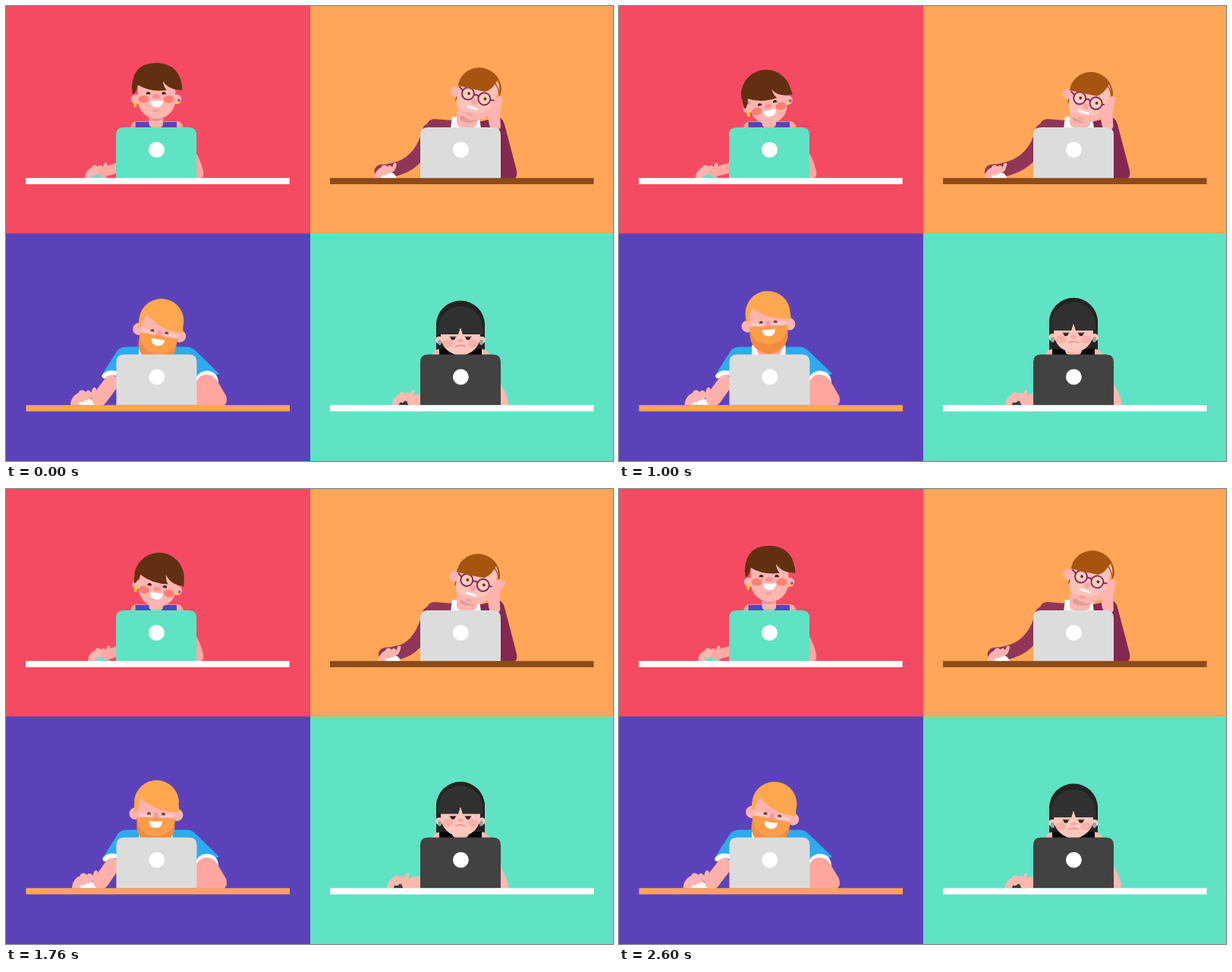
An HTML page for the animation above (2.64 s loop, 800 px wide and 600 px high).

```html
<!DOCTYPE html>
<html lang="en">
<head>
<meta charset="utf-8">
<title>Four desks</title>
<style>
  html, body { margin: 0; width: 100%; height: 100%; overflow: hidden; }
  svg { display: block; width: 100vw; height: 100vh; }
</style>
</head>
<body>
<svg id="stage" viewBox="0 0 800 600" xmlns="http://www.w3.org/2000/svg"></svg>
<script>
const LOOP = 2640, STEP = 40;
const TIMES = [0, 360, 1000, 1320, 1760, 2200];

// Rows per key time: head x, head y, tilt, feature drop, hand x, finger
const POSES = {
  mint: [
    [198.5, 108, 0, 0, 104], [200.5, 114, 5, 4.6, 108], [193.5, 115, -12, 6, 101],
    [191.5, 116, -14, 5.3, 107], [202, 115, 8.6, 5.6, 108], [199, 107, 0, 0, 108]
  ],
  wine: [
    [625, 105, 18, 0, 485.5, 0], [625, 105.5, 18, .6, 489.5, .7], [624, 108, 17.5, 3, 482, 0],
    [624, 108, 17.5, 3.2, 488, 1], [624, 107, 17.5, 2.5, 491, .7], [625, 105.5, 18, 1, 490.5, 0]
  ],
  beard: [
    [205.2, 413.5, 10, 5, 85], [193, 413.8, -7, 4.5, 87], [196, 403.5, -3, 2, 86.5],
    [198.3, 398.5, .5, 0, 82.5], [198.5, 411.5, 2, 5.5, 87], [204, 413.5, 9, 5, 80]
  ],
  fringe: [
    [599, 420.5, 0, 4.5, 509], [599, 412, 0, 0, 509], [599, 416.8, 0, 3, 509],
    [599, 420.2, 0, 4.8, 508], [599, 418, 0, 2.3, 502], [599, 418, 0, 2.3, 509]
  ]
};

const path = (d, fill, more = '') => `<path d="${d}" fill="${fill}" ${more}/>`;
const line = (d, color, w, more = '') =>
  path(d, 'none', `stroke="${color}" stroke-width="${w}" stroke-linecap="round" ${more}`);
const oval = (x, y, rx, ry, fill, more = '') =>
  `<ellipse cx="${x}" cy="${y}" rx="${rx}" ry="${ry}" fill="${fill}" ${more}/>`;
const disc = (x, y, r, fill, more) => oval(x, y, r, r, fill, more);
const rect = (x, y, w, h, fill, r = 0, more = '') =>
  `<rect x="${x}" y="${y}" width="${w}" height="${h}" rx="${r}" fill="${fill}" ${more}/>`;
const pair = (draw, x) => draw(-x) + draw(x);
const at = (x, y, inner) => `<g transform="translate(${x} ${y})">${inner}</g>`;
const part = (id, inner) => `<g id="${id}">${inner}</g>`;

function furniture(x, y, lid, desk) {
  return at(x, y,
    path('M145 227V170Q145 160 155 160H241Q251 160 251 170V227Z', lid) +
    disc(198.4, 189.7, 10.4, '#fff') +
    rect(26, 226.8, 347.6, 8.2, desk));
}

function hand(id, skin, mouse, size = 1) {
  return part(id + 'Hand', `<g transform="scale(${size})">` +
    path('M8 0C10-6 15-9 21-8Q28-6 29 0Z', mouse) +
    path('M0 0C0-7 4-12 9-14C10-18 15-18 17-15C19-18 23-17 23.500-14L25-18.500' +
      'C26-21.500 30-20.500 29.300-17.500L27.500-12Q26-7 21-8Q20-4 17-6Q14-2 11-4Q9-3 9 0Z', skin) +
    '</g>');
}

const smile = y => path(
  `M-8.500 ${y}Q0 ${y + 1} 8.500 ${y}Q8.500 ${y + 9} 0 ${y + 9}Q-8.500 ${y + 9}-8.500 ${y}Z`, '#fff');
const face = (top, side, low, fill) => path(
  `M${-side} ${top}V${low}A${side} ${side} 0 0 0 ${side} ${low}V${top}Z`, fill);
const happyEye = (x, y) => path(`M${x - 2.8} ${y}a2.800 3.300 0 0 1 5.600 0Z`, '#4a1c14');

function mint() {
  const skin = '#ffa8a4', light = '#fdb5b0', hair = '#623010';
  const body =
    line('', skin, 13, 'id="mintArm"') +
    path('M250 193Q257 204 260 218Q262 228 252 228H246Z', skin) +
    path('M164 162Q165 152 172 152H226Q233 153 234 162Z', skin) +
    rect(170.500, 152.800, 54.500, 9, '#5c42ba') +
    path('M188.500 140H207V155Q207 161 198 161Q188.500 161 188.500 155Z', light) +
    oval(198, 147, 9.200, 4.500, '#ea8f8f');
  const head =
    disc(-27.500, 15, 6.200, light) + disc(26.500, 15, 6.200, light) +
    rect(-30, 18, 3.600, 7.500, '#ffd21f', 1.500) +
    path('M24 21L27 15.500L30 20Z', '#ffd21f') + disc(29.500, 16.500, 2, '#8a5bd0') +
    face(-14, 24.800, 16, light) +
    oval(-1, 30, 4, 1.800, '#f69e98') +
    path('M-33 2A33 33 0 0 1 33 2Q0-28-33 2Z', hair) +
    part('mintLook',
      oval(-17, 15, 7, 5, '#ff7f72') + oval(16, 15, 7, 5, '#ff7f72') +
      oval(-.500, 11.500, 5, 3, '#f9938f') +
      happyEye(-11, 8.500) + happyEye(9.500, 8.500) + smile(16.500) +
      path('M-32 8Q-36-33 0-33Q32-32 34 3L24 2Q13-1 8.500-9Q9-2 13 3Q-8 6-25-4Q-26 4-30 8Z', hair));
  return hand('mint', light, '#5fe3c4') + body + part('mintHead', head);
}

function wine() {
  const coat = '#913658', dark = '#84284f', skin = '#fdb4b0', light = '#fdc3bb', hair = '#a85411';
  const lens = x => disc(x, 15, 8, '#fbd9c4', 'fill-opacity=".6" stroke="#8a2a52" stroke-width="2"') +
    disc(x + 1, 14.500, 2, '#6b3a22');
  const body =
    line('', coat, 18, 'id="wineArm"') +
    path('M546 192Q550 172 555 156Q557 149 565 149L590 151V192Z', coat) +
    path('M590 150L626 152L650 147Q655 149 657 156L673 217Q675 227 668 228H640L632 160H590Z', dark) +
    path('M586 162L588 146H624L626 162Z', '#fff') +
    path('M594 138H621V155Q620 161 608 161Q595 161 594 155Z', skin) +
    oval(611, 148, 13, 6, '#e49a98');
  const head =
    path('M-27 15L-25 30L-20 20Z', hair) +
    disc(-28.500, 17.500, 7, skin) +
    face(-10, 24.500, 22, light) +
    path('M-18 38A24.500 24.500 0 0 0 24.500 22L24.500 18Q16 42-18 38Z', '#f7a9a6', 'opacity=".55"') +
    path('M-28 8A29 29 0 0 1 29 8Q14-30-28 8Z', hair) +
    part('wineLook',
      oval(-2, 40, 4.500, 2, '#f6a19f') + oval(-1, 23, 4, 4, '#f8a5a8') +
      lens(-12) + lens(10.500) +
      line('M-3.500 14Q-1 12 2 14M-20 13L-25 10M18.500 14L23 13', '#8a2a52', 2) +
      line('M-7 31H5', '#fff', 2.800) +
      path('M-28 9V0A29 29 0 0 1 29 0L28 9Q27-6 19.400-14Q17 0 9 5.500Q-10 8-28 9Z', hair));
  const prop =
    part('wineProp', line('', skin, 6, 'id="wineFinger"') +
      path('M634 139Q640 132 644 124Q647 119 652 119Q656 121 654 128Q652 136 651 142' +
        'L652 159Q651 164 645 164Q639 164 637 157Z', skin));
  return body + hand('wine', skin, '#fff') + part('wineHead', head) + prop;
}

function beard() {
  const skin = '#ffa69e', light = '#fdb4b0', hair = '#fda84f', blue = '#2eabf0';
  const body =
    line('', '#ffb0aa', 20, 'id="beardArm"') +
    part('beardSleeve', path('M126 487L145 457Q149 449.500 158 449.500H180V490H146Q134 481 126 487Z', blue) +
      line('M129.500 488Q136 481 147 485', '#fff', 6)) +
    path('M170 449.500H238Q245 449.500 250 455L281 485L262 492L251 500H200Z', blue) +
    path('M249 494Q253 481 266 481Q280 483 280 498Z', '#fff') +
    path('M251 496Q254 486 265 486Q275 487 280 497L290 514Q294 527 282 528H250Z', skin) +
    path('M175 462V447H219.500V462Z', '#fff') +
    path('M182 440H214V456Q212 462 198 462Q184 462 182 456Z', skin);
  const head =
    pair(x => disc(x, 17.500, 8, light), 27.500) +
    face(-8, 25, 24, light) +
    path('M-29.500 2A29.500 29.500 0 0 1 29.500 2Q0-32-29.500 2Z', hair) +
    part('beardLook',
      oval(0, 14, 5.500, 4, '#f796a2') +
      face(17, 25, 28, '#f28d40') +
      path('M-25 17H25A25 24 0 0 1-25 17Z', '#fb9d49') +
      happyEye(-9.500, 13) + happyEye(9.500, 13) +
      pair(x => rect(x - 10.500, 11, 21, 4.500, '#fff', 1, 'opacity=".28"'), 13) +
      smile(21) +
      path('M-29 10L-29.500 0A29.500 29.500 0 0 1 29.500 0L30.500 8Q0 10-21-9Q-23 0-25 9Z', hair));
  return hand('beard', light, '#fff', 1.16) + body + part('beardHead', head);
}

function fringe() {
  const skin = '#fdb9b0', light = '#fcc8bd', hair = '#232323';
  const dome = (r, low) => `M${-r} ${low}V0A${r} ${r} 0 0 1 ${r} 0V${low}`;
  const eye = x => path(`M${x - 3.500} 11.500h7q-.5 4-3.500 4q-3 0-3.500-4Z`, '#33201f') +
    line(`M${x - 4} 11.300h8`, '#5b3b3a', 1);
  const back = part('fringeBack', path('M-32 0A32 32 0 0 1 32 0V60H-32Z', hair));
  const body =
    oval(543, 531, 5, 4.500, skin) +
    line('', skin, 15, 'id="fringeArm"') +
    path('M650 494Q658 508 662 521V528H644Z', skin) +
    path('M561 464Q563 452.500 571 452.500H628Q636 453 638 464Z', skin) +
    rect(571, 452, 56, 12, '#070707') +
    path('M588 440H610V455Q609 461 599 461Q589 461 588 455Z', skin) +
    oval(599, 449, 11, 4, '#ea9d98');
  const head =
    pair(x => disc(x, 20, 4.800, light), 28) +
    pair(x => oval(x, 23, 2.500, 3.600, '#98a3a3'), 27.500) +
    face(-6, 26, 14, light) +
    path('M-32 2A32 32 0 0 1 32 2Q0-28-32 2Z', hair) +
    part('fringeLook',
      pair(x => oval(x, 20, 7, 5.200, '#fbb0a9'), 16.500) +
      oval(0, 16.500, 4, 2.500, '#f7a9a4') + pair(eye, 10) +
      line('M-6 24Q0 21 6 24', '#ec8c8b', 1.800) +
      path(dome(32, 8) + 'H3L0-2L-3 8Z', hair) +
      path(dome(29, 8) + 'H3L0-2L-3 8Z', '#313131'));
  return back + hand('fringe', skin, '#383838') + body + part('fringeHead', head);
}

const stage = document.getElementById('stage');
stage.innerHTML =
  rect(0, 0, 401, 300, '#f44b63') + rect(401, 0, 399, 300, '#ffa658') +
  rect(0, 300, 401, 300, '#5c42ba') + rect(401, 300, 399, 300, '#5fe3c4') +
  mint() + furniture(0, 0, '#5fe3c4', '#fff') +
  wine() + furniture(401, 0, '#dcdcdc', '#8d4a1b') +
  beard() + furniture(.4, 299.500, '#dcdcdc', '#ffa652') +
  fringe() + furniture(401, 299.500, '#424242', '#fff');

const parts = {};
stage.querySelectorAll('[id]').forEach(el => parts[el.id] = el);
const move = (id, x, y, turn = 0) => parts[id] &&
  parts[id].setAttribute('transform', `translate(${x} ${y}) rotate(${turn})`);
const shape = (id, d) => parts[id].setAttribute('d', d);

// Periodic cubic that rests at its extremes
function sample(rows, col, t) {
  const n = TIMES.length;
  const time = i => TIMES[(i + n) % n] + Math.floor(i / n) * LOOP;
  const val = i => rows[(i + n) % n][col];
  const rate = i => (val(i + 1) - val(i)) / (time(i + 1) - time(i));
  const slope = i => {
    const a = rate(i - 1), b = rate(i);
    return a * b > 0 ? 2 * a * b / (a + b) : 0;
  };
  let i = n - 1;
  while (TIMES[i] > t) i--;
  const span = time(i + 1) - time(i), u = (t - time(i)) / span, v = 1 - u;
  return v * v * ((1 + 2 * u) * val(i) + u * span * slope(i)) +
    u * u * ((3 - 2 * u) * val(i + 1) - v * span * slope(i + 1));
}

const DESK = { mint: 227, wine: 227, beard: 526.5, fringe: 526.5 };
const ARMS = {
  mint: x => `M152 212L${x + 24} 219`,
  wine: x => `M558 164Q548 204 ${x + 32} 214Q${x + 18} 218 ${x + 9} 218`,
  beard: x => `M${141 + (x - 85) * .4} 494L${x + 38} 518`,
  fringe: x => `M552 517L${x + 27} 521`
};

function draw(t) {
  for (const name in POSES) {
    const [x, y, tilt, drop, hx, bend] = POSES[name][0].map((_, c) => sample(POSES[name], c, t));
    move(name + 'Head', x, y, tilt);
    move(name + 'Back', x, y);
    move(name + 'Look', 0, drop);
    move(name + 'Hand', hx, DESK[name]);
    shape(name + 'Arm', ARMS[name](hx));
    if (name === 'beard') move('beardSleeve', (hx - 85) * .5, 0);
    if (name === 'wine') {
      move('wineProp', (x - 625) * .6, 0);
      shape('wineFinger', `M647 136L${651 + bend * 6} ${123 + bend * 2.5}`);
    }
  }
}

const start = performance.now();
function tick(now) {
  const t = Math.max(0, now - start) % LOOP;
  draw(Math.floor(t / STEP) * STEP);
  requestAnimationFrame(tick);
}
draw(0);
requestAnimationFrame(tick);
</script>
</body>
</html>
```
